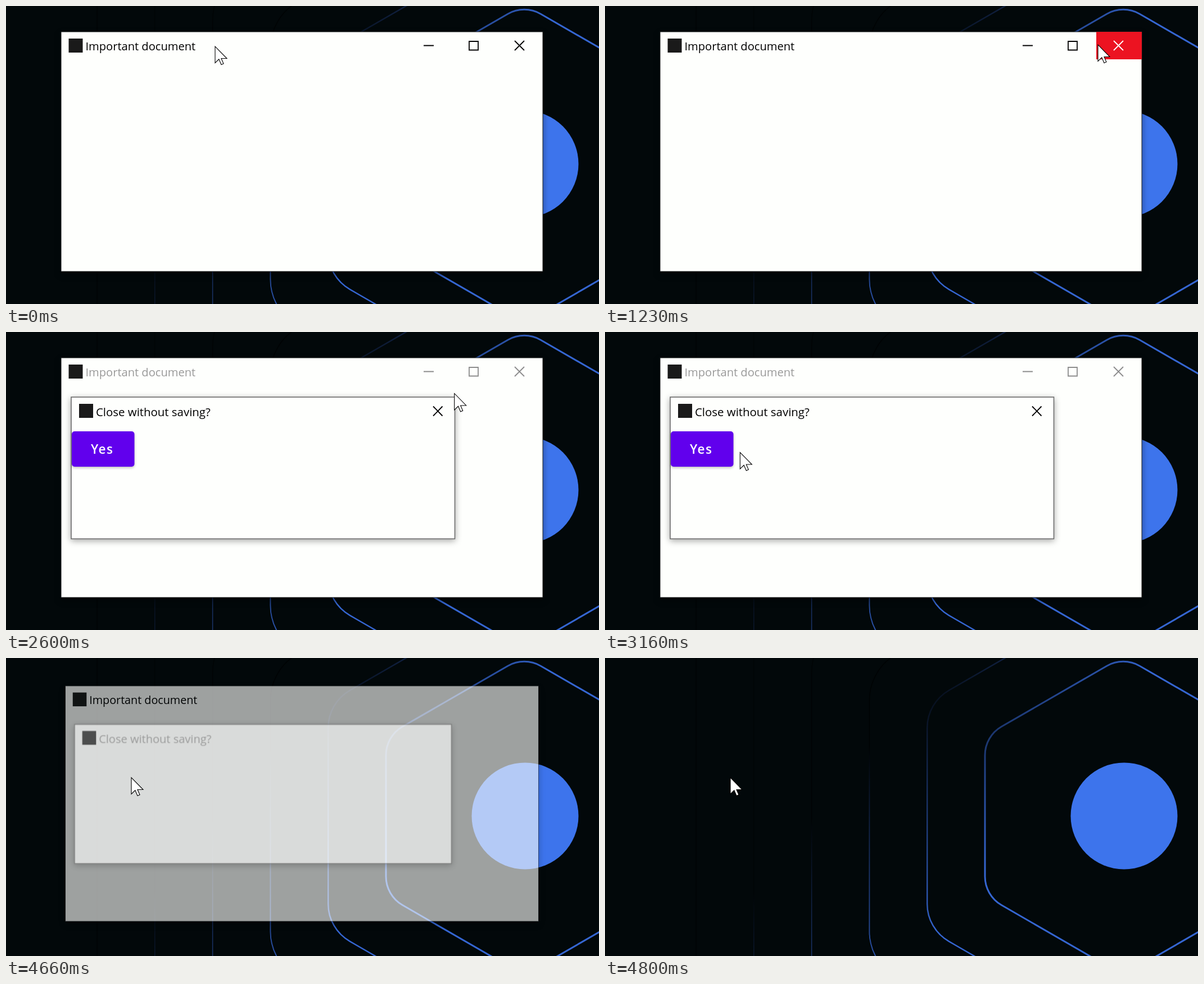
Write an HTML page that moves like this. It is 1055 px wide and 531 px high and loops after 4860 ms.

```html
<!DOCTYPE html>
<html lang="en">
<head>
<meta charset="utf-8">
<title>Close without saving?</title>
<style>
  html, body { margin: 0; width: 100%; height: 100%; overflow: hidden; background: #02080a; }
  svg { display: block; width: 1055px; height: 531px; }
  text { font-family: "Open Sans", "Noto Sans", sans-serif; }
  #rings path { fill: none; stroke: url(#fade); }
  .icon { fill: #1a1a1a; }
  .glyph { fill: none; stroke: currentColor; stroke-width: 1.8; }
  #winBody { filter: drop-shadow(0 5px 6px rgba(0, 0, 0, .4)); }
  #dlgBody { filter: drop-shadow(0 3px 6px rgba(0, 0, 0, .35)); }
  #button { filter: drop-shadow(0 2px 2px rgba(0, 0, 0, .25)); }
</style>
</head>
<body>
<svg viewBox="0 0 1055 531">
  <defs>
    <linearGradient id="fade" gradientUnits="userSpaceOnUse" x1="563" y1="43" x2="796" y2="231">
      <stop offset="0" stop-color="#000304"/>
      <stop offset="1" stop-color="#3566d2"/>
    </linearGradient>
    <clipPath id="buttonClip"><rect x="117" y="177" width="111.5" height="63" rx="5"/></clipPath>
  </defs>

  <g id="rings"></g>
  <circle cx="923.5" cy="281.5" r="95" fill="#3d74ec"/>

  <g id="win">
    <rect id="winBody" x="98" y="46" width="857" height="427" fill="#fefffd" stroke="#1c1f1f"/>
    <rect class="icon" x="111.5" y="58" width="25" height="25"/>
    <text id="winTitle" x="141.500" y="79" font-size="20.1">Important document</text>
    <g id="winButtons">
      <rect id="hover" y="46" width="81" height="49"/>
      <path class="glyph" d="M743 70.5H761M824 63H840V78.5H824Z"/>
      <path id="closeGlyph" class="glyph" d="M905 62L922 79M922 62L905 79"/>
    </g>
  </g>

  <g id="dlg">
    <rect id="dlgBody" x="116" y="116" width="682.5" height="252.5" fill="#fefffd" stroke="#6c6c6c" stroke-width="1.6"/>
    <rect class="icon" x="130" y="128" width="25" height="25"/>
    <text id="dlgTitle" x="160" y="150" font-size="20.4">Close without saving?</text>
    <g id="dlgContent">
      <path class="glyph" d="M760 132.500L776.500 149.500M776.500 132.500L760 149.500"/>
      <rect id="button" x="117" y="177" width="111.5" height="63" rx="5"/>
      <circle id="ripple" cx="223" cy="213" fill="#000" opacity=".08" clip-path="url(#buttonClip)"/>
      <text x="151" y="217" font-size="22.5" font-weight="600" letter-spacing="1.4" fill="#fff">Yes</text>
    </g>
  </g>

  <path id="cursor" d="M0 0V29.500L6.800 22.800L11 32.500L15 30.700L11 21.500H21Z" fill="#fff" stroke="#000" stroke-width="1.1"/>
</svg>
<script>
const LOOP = 4860, DEACTIVATE = 1900, OPEN = 1960, PRESS = 4430, CLOSE = 4590;
const $ = id => document.getElementById(id);
const set = (id, attrs) => { for (const k in attrs) $(id).setAttribute(k, attrs[k]); };
const span = (t, a, b) => Math.min(1, Math.max(0, (t - a) / (b - a)));
const mix = (a, b, p) => a + (b - a) * p;

// Pointy hexagon with rounded corners; cut is the length taken off each side of a corner.
function hexagon(apothem, cut) {
  const R = apothem * 2 / Math.sqrt(3), r = cut * Math.sqrt(3);
  const corner = i => [922 + R * Math.sin(i * Math.PI / 3), 281.3 - R * Math.cos(i * Math.PI / 3)];
  const toward = (a, b) => a.map((v, k) => mix(v, b[k], cut / R).toFixed(1)).join(" ");
  let d = "";
  for (let i = 0; i < 6; i++) {
    const c = corner(i);
    d += `${i ? "L" : "M"}${toward(c, corner(i - 1))}A${r} ${r} 0 0 1 ${toward(c, corner(i + 1))}`;
  }
  return d + "Z";
}

$("rings").innerHTML = [3, 2.4, 1.9, 1.5, 1.2, 1.5].map((w, i) =>
  `<path d="${hexagon(246 + 102.8 * i, 34 + 10.5 * i)}" stroke-width="${w}"/>`).join("");

function pointer(t) {
  if (t < 2430) {
    const u = Math.sin(span(t, 30, 1030) * Math.PI / 2);
    return [mix(372, 877, u), mix(72, 70, u) + 19 * Math.sin(Math.PI * u) - (t >= 1200 ? 1 : 0)];
  }
  const p = span(t, 2430, 3210), u = p * p * (3 - 2 * p);
  return [
    mix(877, 233, u) - 3.5 * span(t, 3210, 3400) - 6.5 * span(t, 3530, 3700),
    mix(69, 214, u) + 60 * Math.sin(Math.PI * u) - span(t, 3210, 3400)
  ];
}

function place(id, cx, cy, scale, opacity) {
  set(id, { transform: `translate(${cx} ${cy}) scale(${scale}) translate(${-cx} ${-cy})`, opacity });
}

function draw(t) {
  const [x, y] = pointer(t);
  set("cursor", { transform: `translate(${x} ${y})` });

  const closing = t >= CLOSE, inactive = t >= DEACTIVATE && !closing;
  const out = span(t, CLOSE, CLOSE + 187), outScale = 1 - .046 * out;
  const away = (1 - span(t, OPEN, OPEN + 250)) ** 3;
  place("win", 526.5, 259.5, outScale, 1 - out);
  place("dlg", 457.5, 242, outScale * (1 - .04 * away), (1 - out) * (1 - away));

  // Title bar buttons, 81 px each, react shortly after the pointer enters;
  // behind the dialog only the close button stays lit until the pointer leaves.
  const [hx, hy] = pointer(Math.max(0, t - 40));
  const button = hy < 95 ? Math.floor((hx - 712) / 81) : -1;
  const over = inactive && button !== 2 ? -1 : button;
  const pressed = t >= 1560 && t < 1700;
  set("hover", {
    x: 712 + 81 * Math.max(0, over),
    opacity: over < 0 ? 0 : 1,
    fill: over < 2 ? "#e5e5e5" : pressed ? "#f1707a" : "#ec1321"
  });
  set("winButtons", { color: inactive ? "#8c8c8c" : "#000", opacity: closing ? 0 : 1 });
  set("closeGlyph", { color: over === 2 ? "#fff" : inactive ? "#8c8c8c" : "#000" });
  set("winTitle", { fill: inactive ? "#999" : "#000" });

  const h = span(t, 3500, 3670);
  set("dlgTitle", { fill: closing ? "#999" : "#000" });
  set("dlgContent", { opacity: closing ? 0 : 1 });
  set("button", { fill: `rgb(${mix(97, 93, h)},0,${mix(237, 226, h)})` });
  set("ripple", { r: t < PRESS ? 0 : mix(42, 115, span(t, PRESS, CLOSE)) });
}

function frame() {
  draw(performance.now() % LOOP);
  requestAnimationFrame(frame);
}
frame();
</script>
</body>
</html>
```
